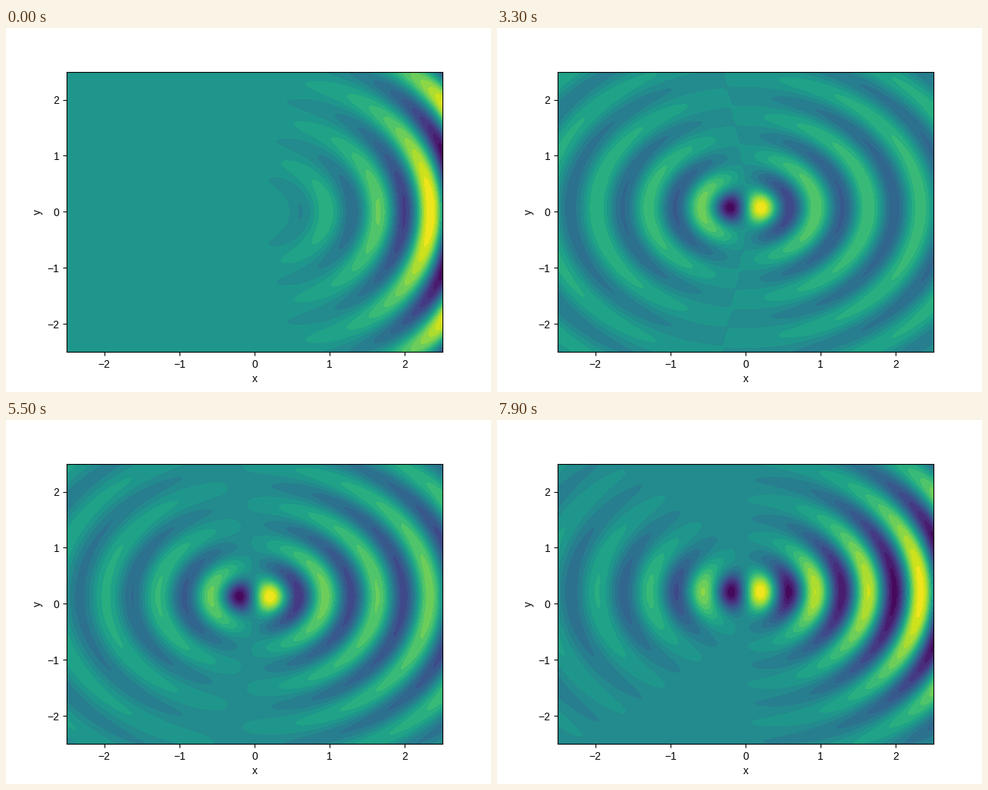
A matplotlib script that plays this animation: 640x480 px, repeating every 8 s.

```python
import numpy as np
import matplotlib.pyplot as plt
from matplotlib.animation import FuncAnimation

plt.rcParams["font.family"] = "Liberation Sans"
plt.rcParams["font.size"] = 10

K = 9.1        # wave number
LAYERS = 20    # filled bands per picture
LIM = 2.5

axis = np.linspace(-LIM, LIM, 131)
X, Y = np.meshgrid(axis, axis)

# Bessel functions of order 1 and 3 from their integral form
Z = np.linspace(0, 36, 900)
TAU = (np.arange(120) + 0.5) * np.pi / 120
BESSEL = {m: np.cos(m * TAU - Z[:, None] * np.sin(TAU)).mean(axis=1)
          for m in (1, 3)}


def bessel(m, z):
    return np.interp(z, Z, BESSEL[m])


def ease(s):
    s = np.clip(s, 0, 1)
    return s * s * (3 - 2 * s)


def polar(cy):
    return np.hypot(X, Y - cy), np.arctan2(Y - cy, X)


def beam(cy):
    """Rings that grow to the right, about 1 high on the outermost crest."""
    r, th = polar(cy)
    z = K * (r - 0.016 * X * (Y - cy) ** 2)
    fan = (np.cos(th) + 0.3) / 1.3
    core = r ** 2 / (r ** 2 + 0.25)
    return np.exp(1.2 * (X - 2.33)) * core * fan * bessel(1, z) / 0.175


def multipole(cy, c1, c3, growth):
    """Standing dipole and hexapole, slightly one-sided far out."""
    r, th = polar(cy)
    lean = 0.15 * r ** 2 / (r ** 2 + 1)
    wave = c1 * bessel(1, K * r) * (np.cos(th) + lean)
    wave -= c3 * bessel(3, K * r) * np.cos(3 * th)
    return np.exp(growth * X) * wave


def field(step):
    start = np.exp(-1.5 * step)
    late = ease((step - 22) / 9)
    burst = np.exp(-((step - 31) / 3) ** 2)    # hexapole takes over briefly
    cy = (1 - start) * (0.05 * np.cos(2 * np.pi * (step - 4) / 11)
                        + 0.00012 * step ** 2)
    c1 = 1 - 1.25 * burst
    c3 = 0.05 + 0.2 * np.cos(2 * np.pi * (step - 4) / 34) + 1.1 * burst
    near = multipole(cy, c1, c3, 0.23 * late - 0.03)
    return (start + 0.04 + 0.16 * late) * beam(cy) + (1 - start) * near


fig, ax = plt.subplots(figsize=(6.4, 4.8), dpi=100)


def draw(frame):
    # the opening picture is held, then a new one comes every second frame
    step = 0 if frame < 5 else 1 + (frame - 5) // 2
    for old in list(ax.collections):
        old.remove()
    f = field(step)
    ax.contourf(X, Y, f, levels=np.linspace(f.min(), f.max(), LAYERS + 1),
                cmap="viridis")
    return ax.collections


ax.set(xlim=(-LIM, LIM), ylim=(-LIM, LIM), xlabel="x", ylabel="y",
       xticks=range(-2, 3), yticks=range(-2, 3))

anim = FuncAnimation(fig, draw, frames=80, interval=100, repeat=True,
                     repeat_delay=0, blit=False)
plt.show()
```
